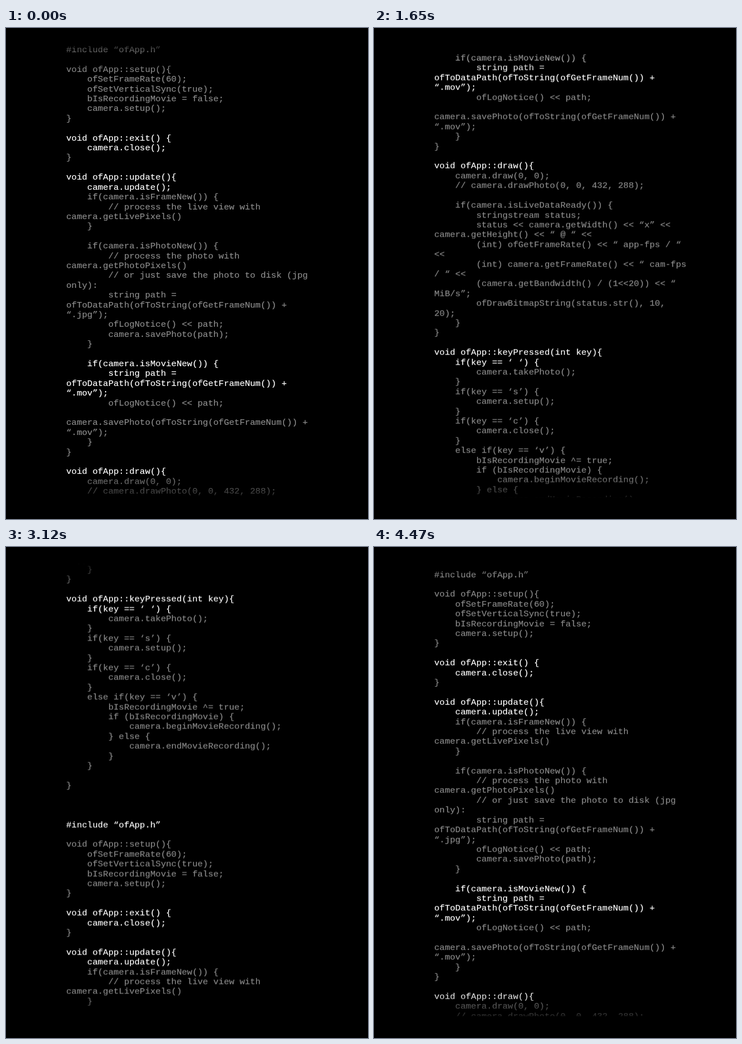
Recreate the animation shown at these times as an HTML page. Size 643 px wide and 871 px high, loop 4.5 s.

```html
<!DOCTYPE html>
<html>
<head>
<meta charset="utf-8">
<style>
  html, body { margin: 0; width: 100%; height: 100%; overflow: hidden; background: #000; }
  #view {
    --fade: linear-gradient(transparent 29px, #0004 35px, #000 78px, #000 788px, #0005 831px, transparent 833px);
    position: absolute; left: 0; top: 0; width: 643px; height: 871px; overflow: hidden;
    -webkit-mask-image: var(--fade); mask-image: var(--fade);
  }
  #code {
    position: absolute; left: 106.8px; top: 0;
    font: 15.56px/17.42px "Liberation Mono", monospace;
    -webkit-text-stroke: 0.2px; color: #8a8a8a; will-change: transform;
  }
  #code div { height: 17.42px; white-space: pre; }
  #code .bright { color: #fff; }
</style>
</head>
<body>
<div id="view"><div id="code"></div></div>
<script>
// Lines starting with * are highlighted.
const listing = `*#include “ofApp.h”

void ofApp::setup(){
    ofSetFrameRate(60);
    ofSetVerticalSync(true);
    bIsRecordingMovie = false;
    camera.setup();
}

*void ofApp::exit() {
*    camera.close();
}

*void ofApp::update(){
*    camera.update();
    if(camera.isFrameNew()) {
        // process the live view with
camera.getLivePixels()
    }

    if(camera.isPhotoNew()) {
        // process the photo with
camera.getPhotoPixels()
        // or just save the photo to disk (jpg
only):
        string path =
ofToDataPath(ofToString(ofGetFrameNum()) +
“.jpg”);
        ofLogNotice() << path;
        camera.savePhoto(path);
    }

*    if(camera.isMovieNew()) {
*        string path =
*ofToDataPath(ofToString(ofGetFrameNum()) +
*“.mov”);
        ofLogNotice() << path;

camera.savePhoto(ofToString(ofGetFrameNum()) +
“.mov”);
    }
}

*void ofApp::draw(){
    camera.draw(0, 0);
    // camera.drawPhoto(0, 0, 432, 288);

    if(camera.isLiveDataReady()) {
        stringstream status;
        status << camera.getWidth() << “x” <<
camera.getHeight() << “ @ “ <<
        (int) ofGetFrameRate() << “ app-fps / “
<<
        (int) camera.getFrameRate() << “ cam-fps
/ “ <<
        (camera.getBandwidth() / (1<<20)) << “
MiB/s”;
        ofDrawBitmapString(status.str(), 10,
20);
    }
}

*void ofApp::keyPressed(int key){
*    if(key == ‘ ‘) {
        camera.takePhoto();
    }
    if(key == ‘s’) {
        camera.setup();
    }
    if(key == ‘c’) {
        camera.close();
    }
    else if(key == ‘v’) {
        bIsRecordingMovie ^= true;
        if (bIsRecordingMovie) {
            camera.beginMovieRecording();
        } else {
            camera.endMovieRecording();
        }
    }

}


`;

const LOOP = 4500, STEP = 30, SPEED = 0.32867, START = 31;
const code = document.getElementById("code");
const lines = listing.split("\n");

for (const line of [...lines, ...lines]) {
  const row = document.createElement("div");
  const bright = line.startsWith("*");
  row.textContent = bright ? line.slice(1) : line;
  if (bright) row.className = "bright";
  code.append(row);
}

function draw(now) {
  const t = Math.floor((now % LOOP) / STEP) * STEP;
  code.style.transform = `translateY(${START - t * SPEED}px)`;
  requestAnimationFrame(draw);
}
draw(performance.now());
</script>
</body>
</html>
```
